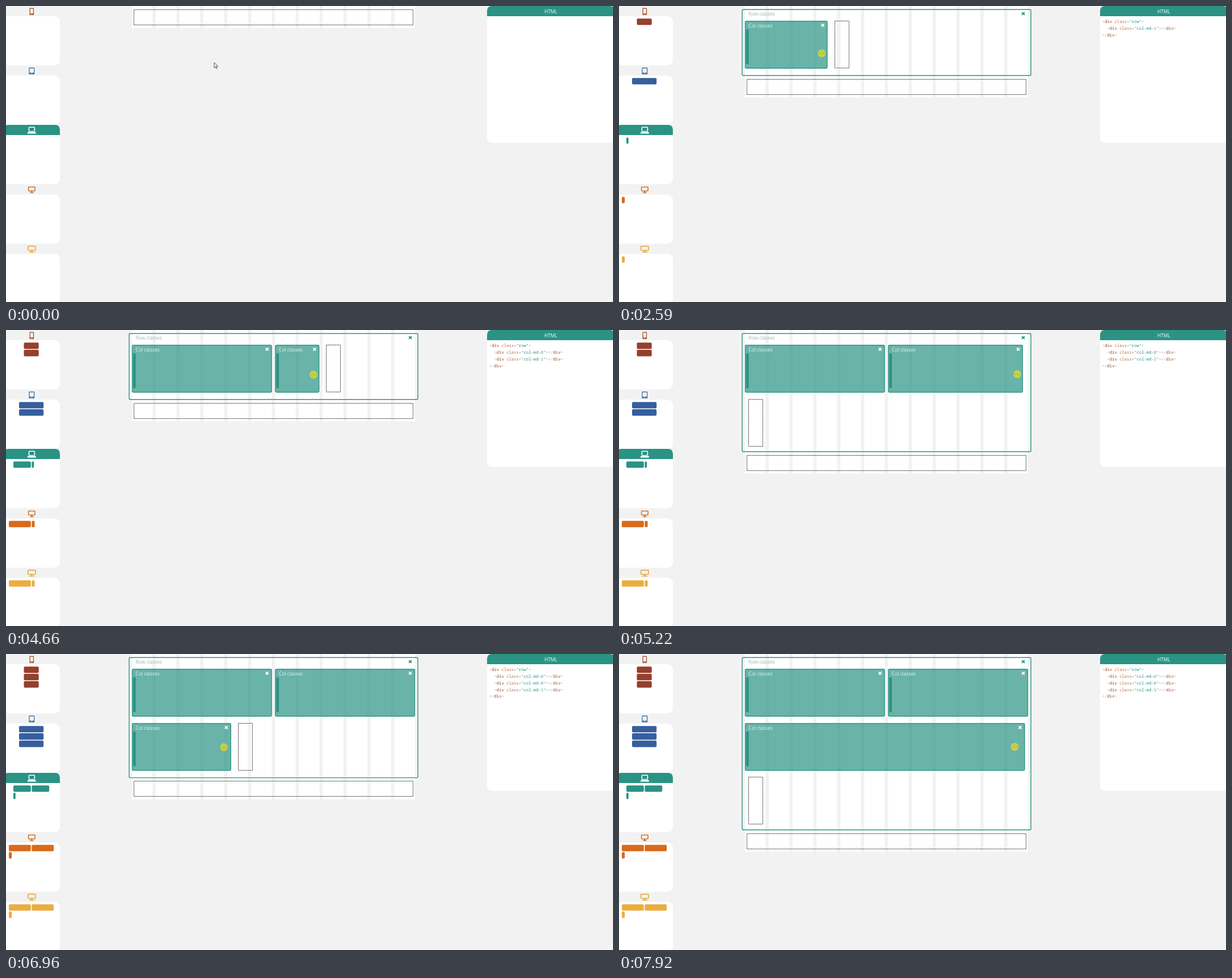
Animation of 1070x523 px, one loop 8000 ms. Source, as an HTML page:

```html
<!DOCTYPE html>
<html lang="en">
<head>
<meta charset="utf-8">
<title>Grid builder</title>
<style>
html, body { margin: 0; width: 100%; height: 100%; overflow: hidden; background: #f2f2f2; }
svg { display: block; }
.ui { font: 8.4px "Open Sans", "Noto Sans", sans-serif; }
.code { font: 7.22px "Noto Sans Mono", "DejaVu Sans Mono", monospace; white-space: pre; }
.dash { fill: none; stroke: #333; stroke-width: 1; stroke-dasharray: 2 1; }
</style>
</head>
<body>
<svg id="stage" width="1070" height="523" viewBox="0 0 1070 523">
  <g id="panels"></g>
  <g id="live"></g>
</svg>
<script>
const LOOP = 8000;
const TEAL = '#2a9384', BG = '#f2f2f2';
const LEFT = 222, PITCH = 42.07, GUTTER = 5.8;
const TOP = 26.2, LINE = 95.8, COL_H = 84.2;
const CARD_PITCH = 105, MINI_MID = 44.6, MINI_GAP = 1.6;
const HOLD = 150, SNAP = 660;

const clamp = v => Math.max(0, Math.min(1, v));
const smooth = p => p * p * (3 - 2 * p);
const glide = p => 1 - (1 - p) ** 1.45;
const progress = (t, from, to) => clamp((t - from) / (to - from));
const spanWidth = n => n * PITCH - GUTTER;

const rect = (x, y, w, h, fill, rx = 0) =>
  `<rect x="${x}" y="${y}" width="${w}" height="${h}" fill="${fill}" rx="${rx}"/>`;
const frame = (x, y, w, h, color, rx = 1, sw = 1.6) =>
  `<rect x="${x}" y="${y}" width="${w}" height="${h}" fill="none" rx="${rx}" stroke="${color}" stroke-width="${sw}"/>`;
const snap = v => Math.floor(v) + .5;
const dashed = (x, y, w, h) =>
  `<rect class="dash" x="${snap(x)}" y="${snap(y)}" width="${w}" height="${h}"/>`;
const label = (x, y, text, fill, extra = '') =>
  `<text class="ui" x="${x}" y="${y}" fill="${fill}" ${extra}>${text}</text>`;
const cross = (x, y, color) =>
  `<path d="M${x - 2.4} ${y - 2.4}l4.8 4.8m0-4.8l-4.8 4.8" stroke="${color}" stroke-width="2"/>`;

const devices = [
  { color: '#963f2d', w: 26.2, stack: true },
  { color: '#365f9f', w: 43.2, stack: true },
  { color: TEAL, w: 63.2 },
  { color: '#d96a1b', w: 79.2 },
  { color: '#ecad40', w: 79.2 }
];

// The pointer leaves at "go", arrives at "at", clicks, then drags the edge to "far".
const row = { go: 70, at: 540, click: 690, x: 346.5, y: 18.5 };
const columns = [
  { line: 0, start: 0, go: 850, at: 1250, click: 1560, drag: 2150, end: 2980, far: 458, y: 82, endY: 85, curve: smooth },
  { line: 0, start: 6, go: 3500, at: 3860, click: 3960, drag: 4430, end: 5220, far: 712, y: 79, endY: 78, curve: smooth },
  { line: 1, start: 0, go: 5530, at: 6090, click: 6250, drag: 6690, end: 7920, far: 715.5, y: 165, endY: 164, curve: glide }
];
for (const c of columns) {
  c.left = LEFT + c.start * PITCH;
  c.x = c.left + 26;
  c.born = c.click + HOLD;
  c.drop = c.end + 160;
}
const clicks = [row, ...columns];
const moves = clicks.flatMap(c => {
  const reach = { from: c.go, to: c.at, x: c.x, y: c.y, curve: smooth };
  return c.far
    ? [reach, { from: c.drag, to: c.end, x: c.far - 10 - 8 * c.line, y: c.endY, curve: c.curve }]
    : [reach];
});

function pointerAt(t) {
  let x = 367, y = 100;
  for (const m of moves) {
    const p = m.curve(progress(t, m.from, m.to));
    x += (m.x - x) * p;
    y += (m.y - y) * p;
  }
  return { x, y };
}

function pointerKind(t) {
  if (clicks.some(c => t >= c.at - 100 && t < c.click + HOLD)) return 'hand';
  return columns.some(c => t >= c.born && t < c.drop + 400) ? 'resize' : 'arrow';
}

const isPressed = t =>
  clicks.some(c => t >= c.click && t < c.click + HOLD) ||
  columns.some(c => t >= c.drag - 130 && t < c.end + 80);

// Quick start, soft landing once the edge is let go.
const settle = (c, t) => 1 - (1 - progress(t, c.drop, c.drop + SNAP)) ** 2.15;

function columnWidth(c, t) {
  const one = spanWidth(1);
  const pulled = one + (c.far - c.left - one) * c.curve(progress(t, c.drag, c.end));
  return pulled + (spanWidth(6) - pulled) * settle(c, t);
}

function panel(x, y, w, h, header) {
  const cap = `<path d="M${x} ${y}v-9q0-9 9-9h${w - 18}q9 0 9 9v9z" fill="${TEAL}"/>`;
  return rect(x, y, w, h, '#fff', 9) + (header ? cap + rect(x, y, w, 10, '#fff') : '');
}

// Handheld icon: body, screen and button around the icon axis.
const handheld = (y, w, h, color) =>
  rect(45.3 - w / 2, y, w, h, color, 1.3) + rect(46.6 - w / 2, y + 1.5, w - 2.6, h - 4.4, BG)
  + `<circle cx="45.3" cy="${y + h - 1.5}" r=".8" fill="${BG}"/>`;

// Screen icon with an optional neck above its foot.
const screen = (y, w, h, foot, color, neck) =>
  frame(45.4 - w / 2, y, w, h, color)
  + (neck ? rect(44.2, y + h, 2.4, 2.8, color) : '')
  + rect(45.4 - foot / 2, y + h + (neck ? 2.4 : 1), foot, neck ? 1.5 : 2.6, color, .7);

function drawPanels() {
  document.getElementById('panels').innerHTML =
    devices.map((d, i) => panel(-4, 18 + CARD_PITCH * i, 99, 87, i === 2)).join('')
    + panel(848, 18, 225, 224, true)
    + label(960.3, 13, 'HTML', '#fff', 'text-anchor="middle"')
    + handheld(3.4, 7.7, 12.6, '#a6532d')
    + handheld(108.7, 10, 12, '#3b73a5')
    + screen(214.2, 10, 7.6, 15, '#fff', false)
    + screen(319.7, 11.6, 7, 6.8, '#cf742f', true)
    + screen(424.4, 13.5, 7.3, 9.2, '#e5a93c', true);
}

function drawColumn(c, t) {
  const x = c.left, y = TOP + c.line * LINE, w = columnWidth(c, t);
  return rect(x, y, w, COL_H, 'rgba(42,147,132,.7)', 2)
    + frame(x + .6, y + .6, w - 1.2, COL_H - 1.2, TEAL, 2, 1.2)
    + rect(x + 2, y + 14.8, 4.6, 62, TEAL, 2)
    + `<svg x="${x + 2}" y="${y}" width="${w - 22.3}" height="20">`
    + label(4.6, 11.6, 'Col classes', 'rgba(255,255,255,.85)') + '</svg>'
    + cross(x + w - 8.4, y + 7.8, '#fff');
}

function drawGrid(t, cols) {
  let rowEnd = 0, inner = '';
  if (t >= row.click + HOLD) {
    const last = cols[cols.length - 1];
    let line = 0, x = LEFT;
    if (last) {
      line = last.line;
      x = last.left + columnWidth(last, t) + GUTTER;
      if (x + spanWidth(1) > 722) { line++; x = LEFT; }
    }
    const y = TOP + line * LINE;
    rowEnd = y + COL_H + (last && last.line === line ? 12.4 : 8.8);
    inner = frame(217.1, 6.2, 509, rowEnd - 6.2, TEAL, 2, 1.4)
      + label(228.6, 17.3, 'Row classes', '#8ebab2') + cross(712.6, 13.5, TEAL)
      + cols.map(c => drawColumn(c, t)).join('')
      + dashed(x + 6.7, y, 25, 83);
  }
  const stripes = Array.from({ length: 12 }, (_, i) =>
    rect(LEFT + i * PITCH, 0, spanWidth(1), rowEnd + 39 - (rowEnd && .5), '#fff')).join('');
  return stripes + inner + dashed(225, rowEnd + 6.2, 492, 27);
}

function drawMinis(t, cols) {
  return devices.map((d, i) => cols.map((c, n) => {
    const unit = (d.w + MINI_GAP) / 12;
    const x = MINI_MID - d.w / 2 + (d.stack ? 0 : c.start * unit);
    const w = d.stack ? d.w : unit * (1 + 5 * settle(c, t)) - MINI_GAP;
    const y = 22.2 + CARD_PITCH * i + 12.9 * (d.stack ? n : c.line);
    return rect(x, y, w, 11.4, d.color, 2);
  }).join('')).join('');
}

function drawCode(t, cols) {
  if (t < row.click + HOLD) return '';
  const ink = (color, text) => `<tspan fill="${color}">${text}</tspan>`;
  const mark = text => ink('#aaa', text);
  const open = name => mark('&lt;') + ink('#93481f', 'div') + ink('#c66f3f', ' class') + mark('=')
    + ink(TEAL, `"${name}"`) + mark('&gt;');
  const close = mark('&lt;/') + ink('#93481f', 'div') + mark('&gt;');
  const lines = cols.length
    ? [open('row'), ...cols.map(c => '  ' + open('col-md-' + (t < c.drop ? 1 : 6)) + close), close]
    : [open('row') + close];
  return lines.map((l, i) =>
    `<text class="code" x="851.8" y="${30.4 + 11.7 * i}">${l}</text>`).join('');
}

const pointers = {
  arrow: '<path d="M0 0v9.2l2.1-2 1.4 3.3 1.5-.7-1.4-3.1h2.9z" fill="#fff" stroke="#222" stroke-width=".8"/>',
  hand: '<path d="M-1 1q1-1.6 2 0v4l4 .9q1.2.4 1.1 1.7l-.7 3.6v1H-.2v-1l-2.8-3.4q-.4-1.4 1-1.2l1 .9z"'
    + ' fill="#fff" stroke="#222" stroke-width=".9"/>',
  resize: '<path d="M-6 0l2.6-2.2v1.7h1.6v1h-1.6v1.7zM6 0l-2.6-2.2v1.7H1.8v1h1.6v1.7zM-.5-4.8H.5v9.6H-.5z"'
    + ' fill="#8f5655"/>'
};

function drawPointer(t) {
  const { x, y } = pointerAt(t), kind = pointerKind(t);
  const spot = isPressed(t) ? '<circle r="7" fill="rgba(250,235,20,.6)"/>' : '';
  const parts = [spot, pointers[kind]];
  if (kind === 'resize') parts.reverse();
  return `<g transform="translate(${x} ${y})">${parts.join('')}</g>`;
}

const live = document.getElementById('live');
function render(t) {
  const cols = columns.filter(c => t >= c.born);
  live.innerHTML = drawGrid(t, cols) + drawMinis(t, cols) + drawCode(t, cols) + drawPointer(t);
}

drawPanels();
render(0);
const begin = performance.now();
function tick() {
  render((performance.now() - begin) % LOOP);
  requestAnimationFrame(tick);
}
requestAnimationFrame(tick);
</script>
</body>
</html>
```
